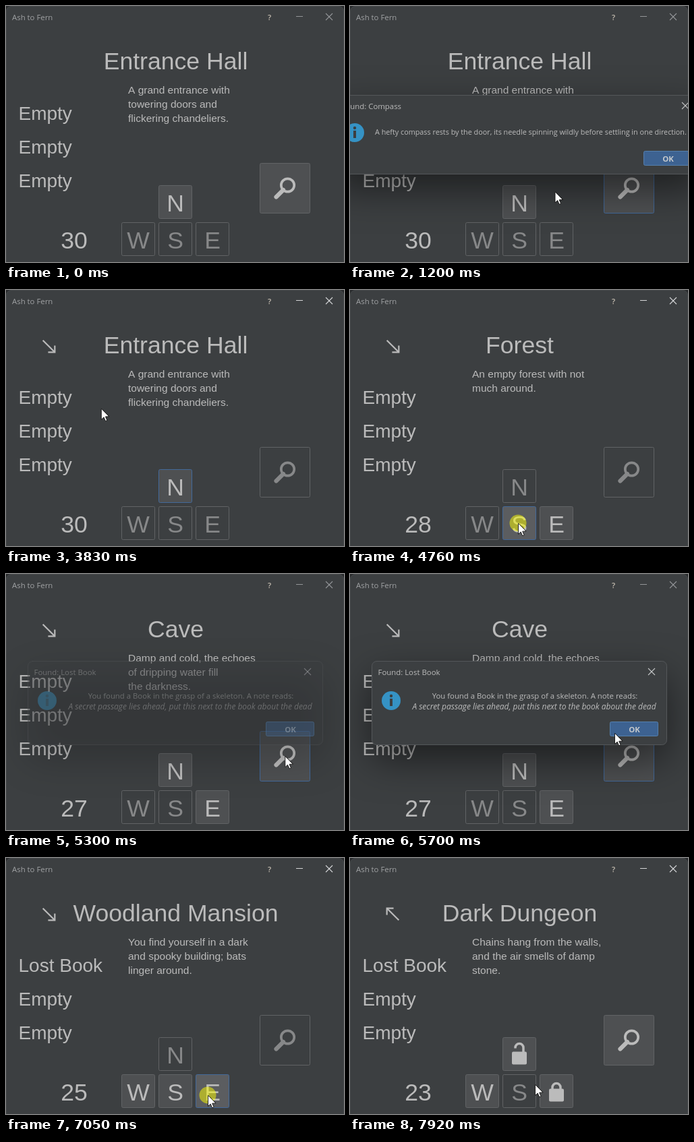
These frames come from a looping animation (501x380 px, 7990 ms). An HTML page with a canvas:

```html
<!DOCTYPE html>
<html lang="en">
<head>
<meta charset="utf-8">
<title>Ash to Fern</title>
<style>
  html, body { margin: 0; width: 100%; height: 100%; overflow: hidden; background: #3c3f41; }
  canvas { display: block; }
</style>
</head>
<body>
<canvas id="stage" width="501" height="380"></canvas>
<script>
const ctx = document.getElementById('stage').getContext('2d');
const LOOP = 7990, TRAVEL = 370, PRESS = 90, FADE = 150;
const BACK = '#3c3f41', TEXT = '#bbbbbb', DIM = '#878889';
const GAME = '"Liberation Sans", Arial, sans-serif';
const SYSTEM = '"Open Sans", "Noto Sans", sans-serif';
const LARGE = `35.6px ${GAME}`, CAPTION = `11.4px ${SYSTEM}`;

// needle: compass angle in degrees, 0 pointing right
const rooms = {
  hall: { title: 'Entrance Hall', exits: { N: 'mansion' }, needle: 45, find: 'compass',
    lines: ['A grand entrance with', 'towering doors and', 'flickering chandeliers.'] },
  mansion: { title: 'Woodland Mansion', exits: { W: 'forest', S: 'hall', E: 'corridor' }, needle: 45,
    lines: ['You find yourself in a dark', 'and spooky building; bats', 'linger around.'] },
  forest: { title: 'Forest', exits: { S: 'cave', E: 'mansion' }, needle: 45,
    lines: ['An empty forest with not', 'much around.'] },
  cave: { title: 'Cave', exits: { N: 'forest', E: 'hall' }, needle: 45, find: 'book',
    lines: ['Damp and cold, the echoes', 'of dripping water fill', 'the darkness.'] },
  corridor: { title: 'Corridor', exits: { W: 'mansion', S: 'dungeon' }, needle: 90,
    lines: ['A narrow passage with', 'faded paintings.'] },
  dungeon: { title: 'Dark Dungeon', exits: { N: 'corridor', W: 'cellar', E: 'vault' }, needle: -135, find: 'key',
    locks: { N: 'open', E: 'shut' },
    lines: ['Chains hang from the walls,', 'and the air smells of damp', 'stone.'] }
};

const dialogs = {
  compass: { x: -21.5, w: 541, h: 117, title: 'Found: Compass', draw() {
    text('A hefty compass rests by the door, its needle spinning wildly before settling in one direction.',
      37, 191, `10.8px ${SYSTEM}`);
  } },
  book: { x: 32.5, w: 437, h: 124, title: 'Found: Lost Book', draw() {
    text('You found a Book in the grasp of a skeleton. A note reads:', 274, 185, `11.35px ${SYSTEM}`, TEXT, 'center');
    text('A secret passage lies ahead, put this next to the book about the dead', 273, 201,
      `italic 12px ${SYSTEM}`, TEXT, 'center');
  } }
};
for (const d of Object.values(dialogs)) {
  d.y = Math.floor(191 - d.h / 2) + 0.5;
  d.ok = [d.x + d.w - 84.5, d.y + d.h - 34.5, 72, 22];
}

const padKey = (col, row) => [171 + 55 * col, 266 + 55 * row, 50, 50];
const buttons = {
  N: padKey(1, 0), W: padKey(0, 1), S: padKey(1, 1), E: padKey(2, 1), search: [376, 233, 75, 75]
};
const spots = { ...buttons, needle: [54, 74, 20, 20], compassOk: dialogs.compass.ok, bookOk: dialogs.book.ok };

// The cursor reaches a spot, off its centre by dx, dy
function visit(at, over, dx = 0, dy = 0) {
  const [x, y, w, h] = spots[over];
  return { at, over, x: x + w / 2 + dx, y: y + h / 2 + dy };
}
const click = (...args) => ({ ...visit(...args), click: true });

const tour = [
  visit(330, 'S', 0, 39), click(760, 'search'), visit(1200, 'search', -110, 5),
  click(1730, 'compassOk', -10), visit(2480, 'N', 19, 3),
  visit(2750, 'needle', -14, 44), visit(3250, 'needle', -54, -40), visit(3620, 'needle', -11),
  click(4030, 'N'), click(4290, 'W'), click(4720, 'S', -2), click(5150, 'search'),
  visit(5650, 'bookOk', -29, 6), click(6150, 'bookOk', -29, 6),
  click(6430, 'N'), click(6770, 'E', -7, 6), click(7000, 'E', -7, 6), visit(7380, 'E', -7, 6),
  visit(7520, 'S', 23, -10), click(7680, 'S', 23, -10)
];

const canSearch = s => rooms[s.room].find && !s.found.includes(rooms[s.room].find);

function release(s, name, time) {
  if (name === 'search') {
    Object.assign(s, { dialog: rooms[s.room].find, since: time, active: false });
  } else if (s.dialog) {
    s.found.push(s.dialog);
    Object.assign(s, { dialog: '', active: true, focus: 'N' });
  } else {
    s.room = rooms[s.room].exits[name];
    s.moves--;
  }
}

// Replays all clicks made before t
function stateAt(t) {
  const s = { room: 'hall', moves: 30, found: [], active: false, focus: '', dialog: '' };
  for (const { at, over } of tour.filter(v => v.click && v.at <= t)) {
    s.active = !s.dialog;
    if (!s.dialog) s.focus = over;
    if (t >= at + PRESS) release(s, over, at + PRESS);
  }
  return s;
}

function cursorAt(t) {
  const i = tour.findLastIndex(v => v.at <= t);
  if (i < 0) return null;
  const a = tour[i], b = tour[i + 1] ?? a;
  const start = Math.max(a.at + (a.click ? PRESS : 0), b.at - TRAVEL);
  const p = t <= start || a === b ? 0 : (t - start) / (b.at - start);
  const k = p * p * (3 - 2 * p);
  return { x: a.x + (b.x - a.x) * k, y: a.y + (b.y - a.y) * k, down: a.click && t < a.at + PRESS };
}

function text(str, x, y, font, color = TEXT, align = 'left') {
  ctx.font = font;
  ctx.fillStyle = color;
  ctx.textAlign = align;
  ctx.fillText(str, x, y);
}

function box(x, y, w, h, r, fill, stroke) {
  ctx.beginPath();
  ctx.roundRect(x, y, w, h, r);
  if (fill) { ctx.fillStyle = fill; ctx.fill(); }
  if (stroke) { ctx.strokeStyle = stroke; ctx.lineWidth = 1; ctx.stroke(); }
}

function disc(x, y, r, color) {
  ctx.beginPath();
  ctx.arc(x, y, r, 0, 7);
  ctx.fillStyle = color;
  ctx.fill();
}

function line(points, color, width, cap = 'butt') {
  ctx.beginPath();
  points.forEach(([x, y]) => ctx.lineTo(x, y));
  ctx.strokeStyle = color;
  ctx.lineWidth = width;
  ctx.lineCap = cap;
  ctx.stroke();
}

function cross(x, y, color) {
  for (const d of [-5, 5]) line([[x - 5, y - d], [x + 5, y + d]], color, 1.1);
}

function magnifier(color) {
  line([[411, 273], [400.5, 283.5]], color, 6.2, 'round');
  ctx.beginPath();
  ctx.arc(417.5, 266, 9.7, 0, 7);
  ctx.lineWidth = 3.7;
  ctx.stroke();
}

function padlock(x, y, open) {
  const lift = open ? 4 : 0;
  box(x - 11, y - 5, 22, 19, 2, TEXT);
  ctx.beginPath();
  ctx.moveTo(x - 6, y - 4 - 1.5 * lift);
  ctx.arc(x, y - 7 - lift, 6, Math.PI, 0);
  ctx.lineTo(x + 6, y - 4);
  ctx.strokeStyle = TEXT;
  ctx.lineWidth = 3.5;
  ctx.lineCap = 'butt';
  ctx.stroke();
}

function drawNeedle(angle) {
  ctx.save();
  ctx.translate(63.5, 83.5);
  ctx.rotate(angle * Math.PI / 180);
  line([[-12.5, 0], [12, 0]], TEXT, 2.2);
  line([[5.5, -7], [12.5, 0], [5.5, 7]], TEXT, 2.2);
  ctx.restore();
}

function drawButton(name, state, cursor) {
  const [x, y, w, h] = buttons[name], room = rooms[state.room];
  const enabled = name === 'search' ? canSearch(state) : name in room.exits;
  const hover = enabled && cursor && !state.dialog &&
    Math.abs(cursor.x - x - w / 2) < w / 2 && Math.abs(cursor.y - y - h / 2) < h / 2;
  const fill = hover ? '#5b5d60' : enabled ? '#4e5052' : BACK;
  const edge = enabled && state.focus === name ? '#43699a' : '#616365';
  box(x + 0.5, y + 0.5, w - 1, h - 1, 2, fill, edge);
  const color = enabled ? TEXT : DIM, lock = room.locks?.[name];
  if (name === 'search') magnifier(color);
  else if (lock) padlock(x + 25, y + 26.5, lock === 'open');
  else text(name, x + 25, y + 39, LARGE, color, 'center');
}

function drawWindow(state, cursor) {
  ctx.fillStyle = '#292b2d';
  ctx.fillRect(0, 0, 501, 380);
  box(0.5, 0.5, 500, 390, 7, BACK, '#45484a');

  const control = state.active ? '#d6d7d8' : '#949698';
  text('Ash to Fern', 9, 21, CAPTION, '#a0a2a4');
  text('?', 390.5, 20.5, `600 ${CAPTION}`, '#c4bcb0', 'center');
  line([[430, 15.5], [440, 15.5]], control, 1);
  cross(479, 16, control);

  const room = rooms[state.room];
  const items = [state.found.includes('book') ? 'Lost Book' : 'Empty', 'Empty', 'Empty'];
  text(room.title, 251.5, 94, LARGE, TEXT, 'center');
  room.lines.forEach((str, i) => text(str, 181, 130 + 21 * i, `15.5px ${GAME}`));
  items.forEach((str, i) => text(str, 18.5, 169 + 50 * i, `28px ${GAME}`));
  text(state.moves, 101, 360, LARGE, TEXT, 'center');
  if (state.found.includes('compass')) drawNeedle(room.needle);
  Object.keys(buttons).forEach(name => drawButton(name, state, cursor));
}

function drawDialog(dialog, opacity) {
  const { x, y, w, h, ok, title } = dialog;
  ctx.save();
  ctx.globalAlpha = opacity;
  ctx.shadowColor = 'rgba(0,0,0,.5)';
  ctx.shadowBlur = 56;
  ctx.shadowOffsetY = 22;
  box(x, y, w, h, 7, BACK);
  ctx.shadowColor = 'transparent';
  box(x, y, w, h, 7, null, '#54575a');
  text(title, x + 9, y + 20.5, CAPTION);
  cross(x + w - 22.5, y + 15.5, '#c4c5c6');

  disc(x + 28.5, 188, 14, '#3592c4');
  disc(x + 28.5, 181, 2.2, BACK);
  ctx.fillRect(x + 26.5, 185, 4, 11);
  dialog.draw();

  box(ok[0] + 0.5, ok[1] + 0.5, 71, 21, 2, '#3d6291', '#5580ae');
  text('OK', ok[0] + 36.5, ok[1] + 15.5, `bold ${CAPTION}`, '#c4c8cc', 'center');
  ctx.restore();
}

function drawCursor({ x, y, down }) {
  if (down) disc(x, y, 12.5, 'rgba(255,255,0,.5)');
  ctx.save();
  ctx.translate(x + 0.5, y + 0.5);
  ctx.beginPath();
  for (const [px, py] of [[0, 0], [0, 16], [3.7, 12.6], [6.2, 18.3], [8.6, 17.3], [6.2, 11.7], [11.2, 11.5]]) {
    ctx.lineTo(px, py);
  }
  ctx.closePath();
  ctx.fillStyle = '#fff';
  ctx.fill();
  ctx.strokeStyle = '#111';
  ctx.lineWidth = 0.9;
  ctx.stroke();
  ctx.restore();
}

function tick() {
  const t = performance.now() % LOOP;
  const state = stateAt(t), cursor = cursorAt(t);
  drawWindow(state, cursor);
  if (state.dialog) drawDialog(dialogs[state.dialog], Math.min(1, (t - state.since) / FADE));
  if (cursor) drawCursor(cursor);
  requestAnimationFrame(tick);
}
tick();
</script>
</body>
</html>
```
